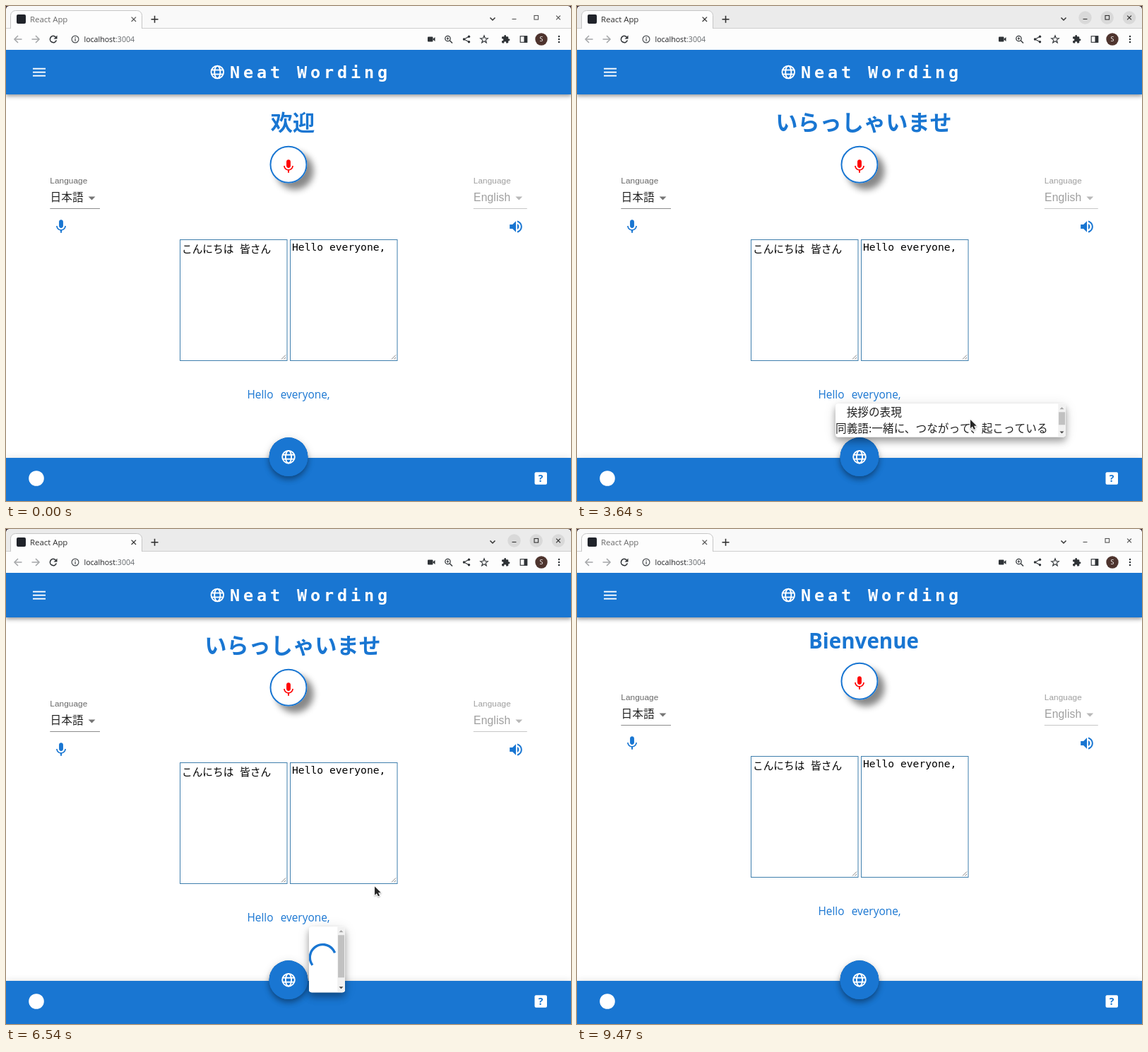
An HTML page with a canvas that plays this animation: 800x700 px, repeating every 9550 ms.

```html
<!DOCTYPE html>
<html lang="en">
<head>
<meta charset="utf-8">
<title>Translator</title>
<style>
html, body { margin: 0; width: 100%; height: 100%; overflow: hidden; background: #fff; }
canvas { display: block; }
</style>
</head>
<body>
<canvas id="stage" width="800" height="700"></canvas>
<script>
const ctx = document.getElementById('stage').getContext('2d');
const LOOP = 9550;
const BLUE = '#1976d2', INK = '#2e3236';
const UI = '"Open Sans", "Noto Sans", sans-serif';
const ARIAL = '"Liberation Sans", Arial, sans-serif';
const CJK = '"Noto Sans CJK JP", "Noto Sans CJK SC", "Noto Sans CJK", sans-serif';
const MONO = '"DejaVu Sans Mono", "Noto Sans CJK JP", "Noto Sans CJK", monospace';

const FOCUS = 2450, BLUR = 9470;
const TITLES = [
  { from: 0, text: '欢迎', font: `700 31.2px ${CJK}`, y: 176, dy: 0 },
  { from: 2770, text: 'いらっしゃいませ', font: `700 31.2px ${CJK}`, y: 176, dy: 0 },
  { from: 6780, text: 'Bienvenue', font: `700 29.5px ${UI}`, y: 168.5, dy: -9 }
];
const POPUPS = [
  { x: 366, w: 326, open: 2450, ready: 3450, close: 5560, thumb: 18,
    lines: ['　挨拶の表現', '同義語:一緒に、つながって、起こっている'] },
  { x: 429, w: 344, open: 6100, ready: 6860, close: 8640, thumb: 23,
    lines: ['　皆さんが;一般的に分離されている、すべて。', '類義 語：'] }
];
// time, x, y of the pointer tip
const POINTER = [
  [920, 732, 524], [1240, 560, 575], [1480, 400, 588], [1720, 365.5, 558.5],
  [2690, 365.5, 558.5], [3330, 548, 590], [3640, 557, 585], [3970, 557, 585],
  [4130, 530, 586], [4290, 530, 586], [5170, 439.5, 547], [6140, 439.5, 547],
  [6540, 522, 505.5], [6780, 535, 523], [7260, 535, 523], [7490, 578, 518], [BLUR, 578, 518]
];

const MIC = new Path2D('M12 14c1.66 0 3-1.34 3-3V5c0-1.66-1.34-3-3-3S9 3.34 9 5v6c0 1.66 1.34 3 3 3zm5.3-3c0 3-2.54 5.1-5.3 5.1S6.7 14 6.7 11H5c0 3.41 2.72 6.23 6 6.72V21h2v-3.28c3.28-.48 6-3.3 6-6.72h-1.7z');
const SPEAKER = new Path2D('M3 9v6h4l5 5V4L7 9H3zm13.5 3c0-1.77-1.02-3.29-2.5-4.03v8.05c1.48-.73 2.5-2.25 2.5-4.02zM14 3.23v2.06c2.89.86 5 3.54 5 6.71s-2.11 5.85-5 6.71v2.06c4.01-.91 7-4.49 7-8.77s-2.99-7.86-7-8.77z');
const PUZZLE = new Path2D('M20.5 11H19V7c0-1.1-.9-2-2-2h-4V3.5a2.5 2.5 0 0 0-5 0V5H4c-1.1 0-2 .9-2 2v3.8h1.5a2.7 2.7 0 0 1 0 5.4H2V20c0 1.1.9 2 2 2h3.8v-1.5a2.7 2.7 0 0 1 5.4 0V22H17c1.1 0 2-.9 2-2v-4h1.5a2.5 2.5 0 0 0 0-5z');
const ARROW = new Path2D('M0 0V12.2L2.9 9.6L4.9 13.8L7 12.9L5 8.8H8.8Z');

const clamp = v => Math.max(0, Math.min(1, v));
const ease = v => { v = clamp(v); return v * v * (3 - 2 * v); };

function rect(x, y, w, h, color) {
  ctx.fillStyle = color;
  ctx.fillRect(x, y, w, h);
}
function rounded(x, y, w, h, r, color) {
  ctx.beginPath();
  ctx.roundRect(x, y, w, h, r);
  ctx.fillStyle = color;
  ctx.fill();
}
function disc(x, y, r, color) {
  ctx.beginPath();
  ctx.arc(x, y, r, 0, 7);
  ctx.fillStyle = color;
  ctx.fill();
}
function ring(x, y, r, color, width, from = 0, to = Math.PI * 2) {
  ctx.beginPath();
  ctx.arc(x, y, r, from, to);
  ctx.strokeStyle = color;
  ctx.lineWidth = width;
  ctx.stroke();
}
function trace(pts) {
  ctx.beginPath();
  for (let i = 0; i < pts.length; i += 2) ctx.lineTo(pts[i], pts[i + 1]);
}
function line(color, width, ...pts) {
  trace(pts);
  ctx.strokeStyle = color;
  ctx.lineWidth = width;
  ctx.stroke();
}
function poly(color, ...pts) {
  trace(pts);
  ctx.fillStyle = color;
  ctx.fill();
}
function text(str, x, y, font, color, align = 'left', spacing = 0) {
  ctx.font = font;
  ctx.fillStyle = color;
  ctx.textAlign = align;
  ctx.letterSpacing = spacing + 'px';
  ctx.fillText(str, x, y);
}
function icon(path, x, y, size, color) {
  ctx.save();
  ctx.translate(x - size / 2, y - size / 2);
  ctx.scale(size / 24, size / 24);
  ctx.fillStyle = color;
  ctx.fill(path);
  ctx.restore();
}
function shadowed(layers, paint) {
  ctx.save();
  for (const [dx, dy, blur, color] of layers) {
    ctx.shadowOffsetX = dx;
    ctx.shadowOffsetY = dy;
    ctx.shadowBlur = blur;
    ctx.shadowColor = color;
    paint();
  }
  ctx.restore();
}
const black = a => `rgba(0,0,0,${a})`;
const lift = n => [[0, n * .6, n, black(.2)], [0, n, n * 1.4, black(.14)], [0, n * .3, n * 2.2, black(.12)]];

function cross(x, y, r, color, width) {
  line(color, width, x - r, y - r, x + r, y + r);
  line(color, width, x + r, y - r, x - r, y + r);
}
function globe(x, y) {
  ring(x, y, 8.8, '#fff', 1.9);
  ctx.beginPath();
  ctx.ellipse(x, y, 4.1, 8.8, 0, 0, 7);
  ctx.stroke();
  for (const d of [-3, 3]) line('#fff', 1.9, x - 8.2, y + d, x + 8.2, y + d);
}

function drawTabs(active) {
  rect(0, 0, 800, 32, active ? '#ebebeb' : '#f9f9f9');
  poly('#33202e', 0, 0, 4, 0, 1.2, 1.2, 0, 4);
  poly('#33202e', 800, 0, 796, 0, 798.8, 1.2, 800, 4);
  rect(0, 31, 800, 1, '#cfcfcf');
  rect(0, 32, 800, 30, '#fdfdfd');
  rounded(6.5, 6.5, 186, 32, [7, 7, 0, 0], '#fdfdfd');
  ctx.strokeStyle = '#c6c6c6';
  ctx.lineWidth = 1;
  ctx.stroke();
  rect(4, 32, 191, 8, '#fdfdfd');
  rounded(15, 12, 13, 13, 2, '#20232a');
  text('React App', 34, 22.5, `11.4px ${UI}`, active ? '#2f2f2f' : '#6a6a6a');
  cross(180.8, 18.8, 3.2, active ? '#333' : '#555', 1.2);
  line('#333', 1.6, 205.5, 18.8, 215.5, 18.8);
  line('#333', 1.6, 210.5, 13.8, 210.5, 23.8);
  line('#333', 1.5, 685.5, 16.5, 689, 20, 692.5, 16.5);
  if (active) for (const x of [719.5, 750.7, 782]) disc(x, 16.5, 9.2, '#d9d9d9');
  const control = active ? '#333' : '#555';
  line(control, 1.1, 716.5, 18.5, 722.5, 18.5);
  ctx.strokeRect(748, 13.5, 5.6, 5.6);
  cross(782, 16.5, 2.9, control, 1.2);
}

function drawToolbar() {
  for (const [x, d] of [[17, 1], [42, -1]]) {
    line('#a4a6a8', 1.5, x - 5 * d, 47, x + 5.5 * d, 47);
    line('#a4a6a8', 1.5, x, 42, x - 5 * d, 47, x, 52);
  }
  ring(67, 47, 4.6, INK, 1.6, .35, 5.5);
  poly(INK, 72.5, 41.5, 72.5, 46.5, 67.5, 46.5);
  ring(98, 47, 4.9, '#4c5054', 1.2);
  rect(97.4, 46.2, 1.3, 3.5, '#4c5054');
  rect(97.4, 44, 1.3, 1.3, '#4c5054');
  text('localhost', 110.5, 51, `10.6px ${UI}`, '#202124');
  text(':3004', 155, 51, `10.6px ${UI}`, '#62666a');

  rounded(597, 43.5, 7.5, 7, 1, INK);
  poly(INK, 604, 47, 607.5, 44, 607.5, 50);
  ring(625.5, 46, 3.7, INK, 1.2);
  line(INK, 1.4, 628.3, 48.8, 632, 52.5);
  line(INK, 1, 623.6, 46, 627.4, 46);
  line(INK, 1, 625.5, 44.1, 625.5, 47.9);
  line(INK, 1.1, 655.5, 43.2, 648.5, 47, 655.5, 50.8);
  for (const [x, y] of [[655.5, 43.2], [648.5, 47], [655.5, 50.8]]) disc(x, y, 1.7, INK);
  ctx.beginPath();
  for (let i = 0; i < 10; i++) {
    const r = i % 2 ? 2.3 : 5.6, a = i * Math.PI / 5 - Math.PI / 2;
    ctx.lineTo(677 + r * Math.cos(a), 47.4 + r * Math.sin(a));
  }
  ctx.closePath();
  ctx.strokeStyle = INK;
  ctx.lineWidth = 1.1;
  ctx.stroke();
  icon(PUZZLE, 707.5, 47, 13, INK);
  ctx.strokeRect(728.2, 42.7, 9.6, 8.6);
  rect(733.5, 42.5, 4.5, 9, INK);
  disc(758, 47, 8.7, '#4e342e');
  text('S', 758, 50.3, `9px ${UI}`, '#fff', 'center');
  for (const y of [43, 47, 51]) disc(783, y, 1.25, INK);
}

function drawHeader() {
  shadowed(lift(4), () => rect(0, 62, 800, 63, BLUE));
  for (const y of [88, 93, 98]) rect(38, y - .3, 18, 1.9, '#fff');
  globe(299.3, 93.5);
  text('Neat Wording', 317, 101.5, `700 23.5px ${MONO}`, '#fff', 'left', 4.85);
}

function drawSelect(x, width, value, font, alpha) {
  text('Language', x, 251.2, `11.75px ${ARIAL}`, black(alpha.label), 'left', .1);
  text(value, x + .3, 276.3, font, black(alpha.value), 'left', .1);
  const a = x + width - 11.5;
  poly(black(alpha.arrow), a - 4.9, 269.5, a + 4.9, 269.5, a, 274.4);
  rect(x, 286, width, 1, black(alpha.rule));
}

function drawTextarea(x, str, baseline) {
  ctx.strokeStyle = '#3f7fad';
  ctx.lineWidth = 1;
  ctx.strokeRect(x + .5, 330.5, 151.5, 171);
  text(str, x + 3, baseline, `14.67px ${MONO}`, '#000');
  line('#777', .9, x + 144, 499.5, x + 150, 493.5);
  line('#777', .9, x + 147.5, 499.5, x + 150, 497);
}

function drawPage(title) {
  text(title.text, 406, title.y, title.font, BLUE, 'center');
  ctx.save();
  ctx.translate(0, title.dy);
  shadowed([[9, 9, 10, '#888']], () => disc(400, 224.3, 26.5, '#fff'));
  ring(400, 224.3, 25.5, BLUE, 2);
  icon(MIC, 400, 227, 23.5, '#f00');
  drawSelect(62.3, 70.7, '日本語', `15.66px ${CJK}`, { label: .6, value: .87, arrow: .54, rule: .45 });
  drawSelect(661.8, 76, 'English', `15.7px ${ARIAL}`, { label: .38, value: .38, arrow: .28, rule: .22 });
  icon(MIC, 78, 312, 23.5, BLUE);
  icon(SPEAKER, 722, 312, 23.5, BLUE);
  drawTextarea(246, 'こんにちは 皆さん', 349.3);
  drawTextarea(402, 'Hello everyone,', 346);
  text('Hello', 341.4, 555, `15.4px ${UI}`, BLUE);
  text('everyone,', 388.7, 555, `15.4px ${UI}`, BLUE);
  ctx.restore();
}

function drawFooter() {
  shadowed([[0, 1, 10, black(.16)]], () => rect(0, 639, 800, 61, BLUE));
  shadowed(lift(6), () => disc(400, 637.7, 27.4, BLUE));
  globe(400, 637.7);
  disc(43, 668, 10.8, '#fff');
  rounded(748.5, 659.3, 17.5, 17.5, 2, '#fff');
  text('?', 757.2, 673, `700 14px ${UI}`, BLUE, 'center');
}

function drawScrollbar(x, height, thumb, endColor) {
  rect(x, 0, 10.5, height, '#f1f1f1');
  const c = x + 5.2;
  poly('#a3a3a3', c - 3, 8, c + 3, 8, c, 5);
  rect(x + .8, 12, 9, thumb, '#c1c1c1');
  poly(endColor, c - 3, height - 8, c + 3, height - 8, c, height - 5);
}

function drawSpinner(x, y, elapsed) {
  const p = elapsed / 1400 % 1;
  const a = ease(p * 2), b = ease(p * 2 - 1);
  const offset = 15 * a + 110 * b;
  const end = Math.min(126, offset + 1 + 99 * a);
  const unit = Math.PI * 2 / 126.9, spin = p * Math.PI * 2;
  ring(x, y, 18.2, BLUE, 3.4, spin + offset * unit, spin + end * unit);
}

function drawPopup(p, t) {
  if (t < p.open || t >= p.close + 240) return;
  const closing = t >= p.close;
  const shown = closing ? 1 - ease((t - p.close) / 180) : ease((t - p.open) / 240);
  const grow = closing ? 1 - Math.pow(1 - shown, 7) : shown;
  const scale = .75 + .25 * grow;
  const loading = t < p.ready;
  const w = loading ? 51 : p.w, h = loading ? 93 : 47.3;
  ctx.save();
  ctx.globalAlpha = shown;
  ctx.translate(p.x, 562.3);
  ctx.scale(scale, scale * scale);
  shadowed(lift(8), () => rounded(0, 0, w, h, 4, '#fff'));
  ctx.beginPath();
  ctx.roundRect(0, 0, w, h, 4);
  ctx.clip();
  drawScrollbar(w - 10.7, h, loading ? 60 : p.thumb, '#444');
  if (loading) drawSpinner(19.5, 43.5, t - p.open);
  else p.lines.forEach((str, i) => text(str, 0, 17.2 + i * 23.2, `15.66px ${CJK}`, black(.87)));
  ctx.restore();
}

function drawPointer(t) {
  if (t < POINTER[0][0] || t >= BLUR) return;
  const i = POINTER.findIndex(k => k[0] > t);
  const [t0, x0, y0] = POINTER[i - 1], [t1, x1, y1] = POINTER[i];
  const f = (t - t0) / (t1 - t0);
  ctx.save();
  ctx.translate(x0 + (x1 - x0) * f, y0 + (y1 - y0) * f);
  ctx.lineJoin = 'round';
  ctx.strokeStyle = '#fff';
  ctx.lineWidth = 1.8;
  ctx.shadowColor = black(.3);
  ctx.shadowBlur = 2;
  ctx.shadowOffsetY = 1;
  ctx.stroke(ARROW);
  ctx.shadowColor = 'transparent';
  ctx.fillStyle = '#262626';
  ctx.fill(ARROW);
  ctx.restore();
}

function draw(t) {
  rect(0, 0, 800, 700, '#fff');
  drawPage(TITLES.filter(k => k.from <= t).pop());
  drawHeader();
  drawTabs(t >= FOCUS && t < BLUR);
  drawToolbar();
  drawFooter();
  for (const p of POPUPS) drawPopup(p, t);
  drawPointer(t);
}

const start = performance.now();
function tick() {
  draw((performance.now() - start) % LOOP);
  requestAnimationFrame(tick);
}
tick();
</script>
</body>
</html>
```
